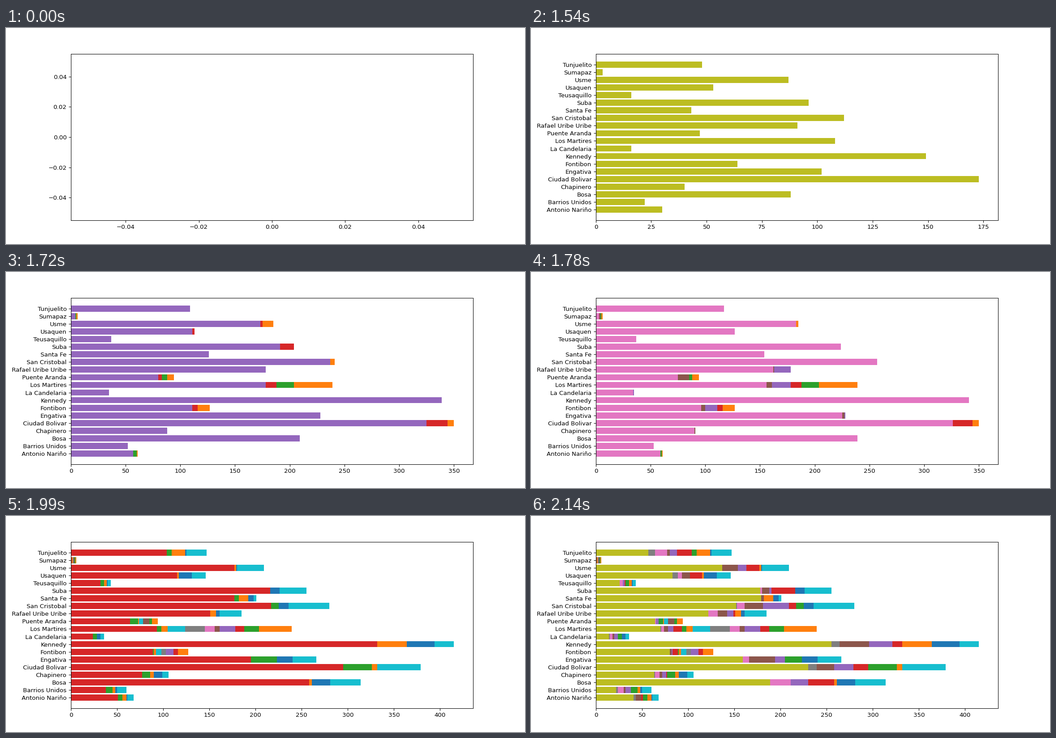
Recreate the animation shown at these times as a matplotlib script. Size 1159 px wide and 483 px high, loop 2.2 s.

```python
import numpy as np
import matplotlib.pyplot as plt
from matplotlib.animation import FuncAnimation

TICK = 10            # ms per animation frame
LOOP = 2200
START = 1450         # first bars appear
STEP = 30            # ms between bar layers
STEPS = 24
FIRST_PLACES = 18    # the last two places join after the first layer

# Counts of each place at the early, peak and last key step.
PLACES = {
    "Antonio Nariño": (61, 68, 41),
    "Barrios Unidos": (48, 60, 22),
    "Bosa": (189, 314, 189),
    "Chapinero": (80, 106, 63),
    "Ciudad Bolivar": (350, 379, 230),
    "Engativa": (218, 266, 159),
    "Fontibon": (127, 98, 80),
    "Kennedy": (302, 415, 255),
    "La Candelaria": (34, 36, 14),
    "Los Martires": (239, 124, 70),
    "Puente Aranda": (94, 78, 64),
    "Rafael Uribe Uribe": (178, 185, 122),
    "San Cristobal": (241, 280, 152),
    "Santa Fe": (88, 201, 179),
    "Suba": (190, 255, 178),
    "Teusaquillo": (34, 43, 26),
    "Usaquen": (103, 146, 83),
    "Usme": (185, 209, 137),
    "Sumapaz": (6, 2, 0),
    "Tunjuelito": (101, 147, 57),
}
NAMES = list(PLACES)
KEY_STEPS = [0, 6, 14, 23]


def make_counts():
    """Straight lines between the key steps, with random dips on the way."""
    rng = np.random.default_rng(4)
    dips = 0.12 * rng.random((STEPS, len(NAMES)))
    dips[KEY_STEPS] = 0
    lines = [np.interp(range(STEPS), KEY_STEPS,
                       (round(peak / 38), early, peak, last))
             for early, peak, last in PLACES.values()]
    return np.round(np.transpose(lines) * (1 - dips))


COUNTS = make_counts()

# a 12 inch wide figure, scaled to the stage; the tiny extra guards rounding
DPI = 1159 / 12
fig, ax = plt.subplots(figsize=(12, (483 + 1e-6) / DPI), dpi=DPI)
state = {}


def draw_empty():
    ax.clear()
    ax.set(xlim=(-0.055, 0.055), ylim=(-0.055, 0.055))


def draw_bars(step):
    ax.clear()
    n = FIRST_PLACES if step == 0 else len(NAMES)
    rows = np.arange(n)
    counts = COUNTS[:step + 1, :n]
    for s, width in enumerate(counts):
        seen = width > counts[s + 1:].max(axis=0, initial=0)
        ax.barh(rows[seen], width[seen], color=f"C{(s + 5) % 10}")
    pad = 0.05 * (n - 0.2)
    ax.set_yticks(rows, NAMES[:n])
    ax.set_xlim(0, 1.05 * counts.max())
    ax.set_ylim(-0.4 - pad, n - 0.6 + pad)


def init():
    state["step"] = None
    return []


def update(frame):
    step = max((frame * TICK - START) // STEP, -1)
    step = min(step, STEPS - 1)
    if step != state.get("step"):
        state["step"] = step
        if step < 0:
            draw_empty()
        else:
            draw_bars(step)
    return []


anim = FuncAnimation(fig, update, frames=LOOP // TICK, init_func=init,
                     interval=TICK, repeat=True, blit=False)
plt.show()
```
